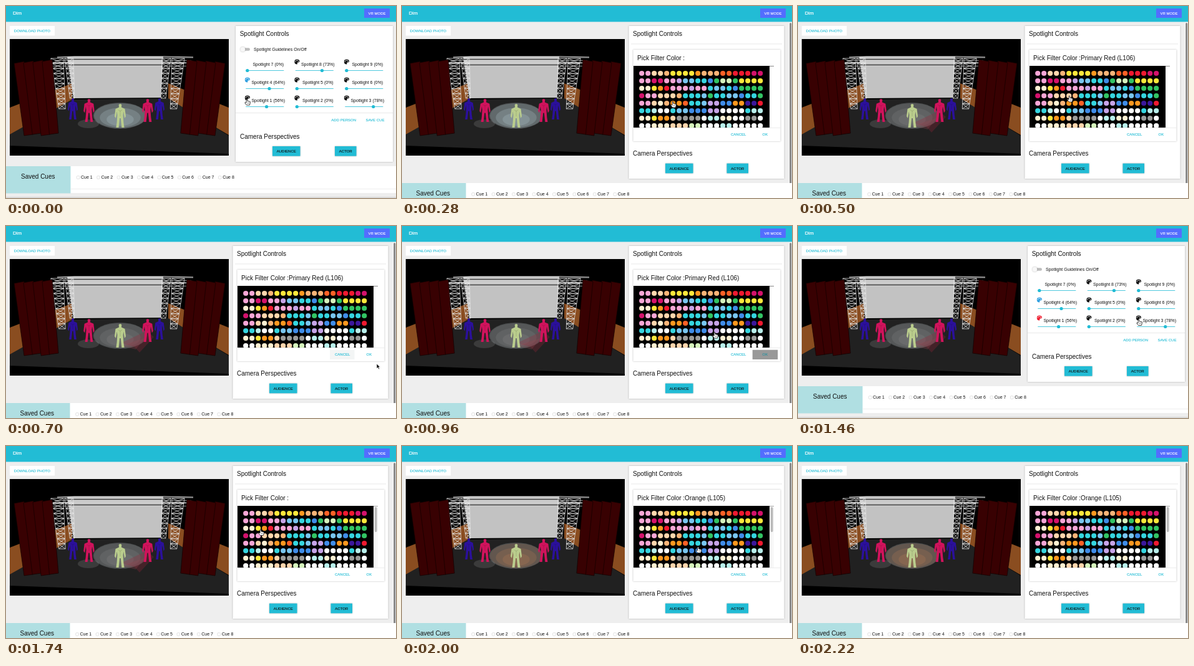
Write an HTML page that moves like this. It is 625 by 308 pixels and loops after 2.24 s.

```html
<!DOCTYPE html>
<html lang="en">
<head>
<meta charset="utf-8">
<title>Stage lighting</title>
<style>
html, body { margin: 0; width: 100%; height: 100%; overflow: hidden; background: #eee; }
svg { display: block; width: 625px; height: 308px; font-family: "Liberation Sans", Arial, sans-serif; }
.paper { filter: drop-shadow(0 .7px .9px rgba(0,0,0,.3)); }
</style>
</head>
<body>
<svg id="app" viewBox="0 0 625 308" xmlns="http://www.w3.org/2000/svg"></svg>
<script>
const LOOP = 2240;
const CYAN = '#22bcd5', INK = '#111';

const rect = (x, y, w, h, fill, more = '') =>
  `<rect x="${x}" y="${y}" width="${w}" height="${h}" fill="${fill}" ${more}/>`;
const text = (x, y, size, s, fill = INK, more = '') =>
  `<text x="${x}" y="${y}" font-size="${size}" fill="${fill}" ${more}>${s}</text>`;
const label = (x, y, s, fill = CYAN, more = '') =>
  text(x, y, 6, s, fill, `stroke="${fill}" stroke-width=".12" ${more}`);
const poly = (points, fill, more = '') => `<polygon points="${points.join(' ')}" fill="${fill}" ${more}/>`;
const line = (d, color, w = .8) => `<path d="${d}" fill="none" stroke="${color}" stroke-width="${w}"/>`;
const dot = (x, y, r, fill, more = '') => `<circle cx="${x}" cy="${y}" r="${r}" fill="${fill}" ${more}/>`;
const oval = (x, y, rx, ry, fill, o) =>
  `<ellipse cx="${x}" cy="${y}" rx="${rx}" ry="${ry}" fill="${fill}" opacity="${o}"/>`;
const group = (id, body) => `<g id="${id}">${body}</g>`;
const paper = (x, y, w, h, fill = '#fff') => rect(x, y, w, h, fill, 'class="paper"');
const mix = (a, b, k) => a + (b - a) * k;

function seeded(seed) {
  return () => (seed = (seed * 16807) % 2147483647) / 2147483647;
}

// The camera looks down, so verticals lean towards the middle of the stage
const MID = 182;
const lean = (x, y, rate = .00077) => mix(x, MID, (y - 85) * rate);

function truss(left, right, bottom) {
  const n = Math.round((bottom - 84) / 8);
  const taper = k => (right - left) * .2 * k;
  const at = (x, k, side) => {
    const y = mix(84, bottom, k);
    return `${(lean(x, y, .001) + side * taper(k)).toFixed(1)} ${y.toFixed(1)}`;
  };
  let d = `M${at(left, 0, 1)}L${at(left, 1, 1)}M${at(right, 0, -1)}L${at(right, 1, -1)}`;
  for (let i = 0; i < n; i++) {
    const a = i / n, b = (i + 1) / n;
    d += `M${at(left, a, 1)}L${at(right, a, -1)}L${at(left, b, 1)}L${at(right, b, -1)}`;
    d += `M${at(left, a, 1)}L${at(right, b, -1)}`;
  }
  return line(d, '#e6e6e6', .75);
}

function curtains(flip) {
  let s = '';
  for (let i = 0; i < 4; i++) {
    const x = 13 + i * 15, top = 92 - i, foot = 208 - i % 2 * 2;
    const side = v => (flip ? 2 * MID - v : v).toFixed(1);
    const l = lean(x, foot), r = lean(x + 16, foot);
    s += poly([side(x), top, side(x + 16), top - 3, side(r), foot - 2, side(l), foot], '#380102',
      'stroke="#120000" stroke-width=".7"');
  }
  return s;
}

function figure(x, y, h, fill) {
  const half = [[0, 0], [2.3, 1], [2, 5.6], [7.5, 8], [9, 20], [7, 23], [5.2, 12.5], [4.6, 18], [5.4, 30], [6.6, 38], [2.4, 38], [.8, 23]];
  const all = half.concat(half.slice(1).reverse().map(([a, b]) => [-a, b]));
  return `<g transform="translate(${x} ${y}) scale(${h / 38})">${poly(all, fill)}` +
    line('M-3 10Q0 13 3 10M0 11V20', 'rgba(0,0,0,.18)', .7) + '</g>';
}

function stage() {
  const frame = 'x="6" y="53" width="351" height="187"';
  let s = `<clipPath id="view"><rect ${frame}/></clipPath><g clip-path="url(#view)"><rect ${frame} fill="#000"/>`;
  for (const edge of [6, 357]) {
    const back = edge < MID ? 106 : 260;
    s += poly([back, 124, edge, 163, edge, 207, back, 150], '#8a4d20');
  }
  s += poly([6, 206, 106, 150, 260, 148, 357, 208, 357, 237, 6, 224], '#212121');
  s += poly([98, 81, 252, 81, 248, 147, 108, 148], '#c2c2c2');
  for (let i = 0; i < 4; i++) {
    const y = 81 + i * 4.5;
    s += line(`M${82 - i * 4} ${y + 1}L110 ${y}H254L${300 - i * 3} ${y + 1}`, i % 2 ? '#1b1b1b' : '#e4e4e4', 1);
    s += line(`M${82 - i * 4} ${y + 2}H104M252 ${y + 2}H${300 - i * 3}`, '#ddd', .6);
  }
  for (const [a, b, foot] of [[72, 92, 165], [94, 108, 148]]) {
    s += truss(a, b, foot) + truss(2 * MID - b - 6, 2 * MID - a - 6, foot);
  }
  s += curtains(false) + curtains(true);
  s += oval(132, 189, 17, 7, '#777', .3) + oval(182.5, 176, 43, 21, '#8d979a', .36);
  const rings = (id, color, o) => group(id, [1, .78, .52].map((k, i) =>
    oval(183, 176 + i * 3, 42 * k, 20 * k, color, o)).join(''));
  s += rings('white', '#b4cbd2', .23) + rings('dim', '#a0a0a0', .14) + rings('orange', '#c98058', .2);
  s += group('red', poly([184, 188, 226, 168, 237, 178, 214, 203, 206, 194], 'rgba(150,38,58,.3)') +
    poly([183, 192, 222, 180, 208, 198], 'rgba(150,70,80,.28)'));
  for (const side of [-1, 1]) {
    s += figure(176.5 + side * 69.5, 148, 34, '#2b109b') + figure(180 + side * 47, 149, 37, '#d0135c');
  }
  return s + figure(183, 157, 38, '#bacd8d') + '</g>';
}

function cues(dx, y, left) {
  let s = rect(0, y, 625, 43, '#fff') + rect(0, y, left, 43.5, '#b0dfe2');
  s += text(24 + dx, y + 20.2, 10, 'Saved Cues');
  for (let i = 0; i < 8; i++) {
    const x = 120 + dx + i * 32.45;
    s += rect(x - 6.7, y + 15.7, 4.6, 4.6, '#fff', 'rx="1" stroke="#c4c4c4" stroke-width=".5"');
    s += text(x, y + 20.2, 7, 'Cue ' + (i + 1));
  }
  return s;
}

function cameras(x, y, gap) {
  const button = (bx, w, name) => paper(bx, y + 12.3, w, 15.7, CYAN) +
    label(bx + w / 2, y + 22.4, name, INK, 'text-anchor="middle"');
  return text(x, y, 10, 'Camera Perspectives') + button(x + 52, 44.5, 'AUDIENCE') + button(x + gap, 34.5, 'ACTOR');
}

// Artist's palette with four paint wells
function icon(x, y, fill, id) {
  const wells = [0, 1, 2, 3].map(i => {
    const a = Math.PI * (1.08 + i * .28);
    return dot((x + 2.5 * Math.cos(a)).toFixed(2), (y + 2.5 * Math.sin(a)).toFixed(2), .7, '#fff');
  }).join('');
  return `<path id="${id}" fill="${fill}" d="M${x} ${y - 4}a4 4 0 1 0 0 8q1.2-.4.5-1.8q-.2-1 .7-1.2h1.2q1.8-.2 1.8-2q-.4-3-4.2-3z"/>` + wells;
}

function mainPage() {
  const levels = [0, 73, 0, 64, 0, 0, 56, 0, 78];
  let s = paper(368, 32, 252, 218) + text(374.7, 48, 10, 'Spotlight Controls');
  s += rect(378, 67.2, 13, 4.6, '#bdbdbd', 'rx="2.3"') + dot(379.5, 69.5, 3.8, '#f7f7f7', 'class="paper"');
  s += text(397, 72, 7, 'Spotlight Guidelines On/Off');
  levels.forEach((level, i) => {
    const col = i % 3, row = (i - col) / 3, n = 7 - 3 * row + col;
    const x = 384.3 + col * 79.5, y = 103.5 + row * 29;
    s += line(`M${x} ${y}h61`, CYAN, .8) + dot(x + 2.5 + level * .55, y, 2.6, CYAN);
    s += text(x + 36, y - 8, 7, `Spotlight ${n} (${level}%)`, INK, 'text-anchor="middle"');
    if (i) s += icon(x + 2.5, y - 14, n === 4 ? '#2f9fe0' : INK, 'icon' + n);
  });
  s += rect(368, 171, 252, .8, '#e4e4e4') + label(521.3, 184.7, 'ADD PERSON') + label(576.5, 184.7, 'SAVE CUE');
  return s + cameras(375, 212.7, 152) + cues(0, 257, 103.5) +
    rect(103.5, 293, 522, .7, '#e8e8e8') + rect(0, 306.6, 625, .8, '#bbb');
}

// Each row runs through its own colour ramp with a little shuffling
function swatches() {
  const hue = {
    p: '#f8a6d6', c: '#fff0d2', a: '#ffd6ad', t: '#f9b477', o: '#ff981f', y: '#ffe83b', r: '#f01930',
    d: '#ff6126', m: '#d4116c', l: '#c7a4e8', s: '#78c6f1', b: '#3f8ce8', q: '#35d5df',
    g: '#32c463', i: '#3b179c', w: '#ffffff', e: '#9b9b99', u: '#b9f0ec', v: '#d6f4bd'
  };
  const ramps = ['pcatyyotddrrm', 'pmmplsqbgvgyy', 'cyorplpqsqbgg', 'mpaatqsgqsbqg', 'pactodqslbyoir', 'quwqsbblwwqu', 'cyoaeewuvcwew', 'wcavwuww'];
  const rnd = seeded(41);
  let s = '';
  ramps.forEach((ramp, row) => {
    for (let i = 0; i < 20; i++) {
      const k = Math.floor((i + rnd() * 1.2) * ramp.length / 20);
      s += dot(384.2 + i * 10, 108 + row * 12, 4.1, hue[ramp[Math.min(k, ramp.length - 1)]]);
    }
  });
  return s;
}

function pickerPage() {
  let s = rect(619.5, 25, 5.5, 283, '#f3f3f3') + rect(621.2, 27, 3, 263, '#858585', 'rx="1.5"');
  s += paper(363.5, 32, 249, 245) + text(370, 48, 10, 'Spotlight Controls');
  s += rect(367, 60.5, 242, .8, '#e4e4e4') + paper(370.5, 70, 236, 147);
  s += text(377, 87.3, 10, '', INK, 'id="title"');
  s += rect(371, 96, 225, .7, '#555') + rect(371, 96, 218, 99, '#000');
  s += `<clipPath id="well"><rect x="371" y="96" width="218" height="99"/></clipPath><g clip-path="url(#well)">${swatches()}</g>`;
  s += group('bar', rect(589, 96.7, 7, 98.3, '#f8f8f8') + rect(590.6, 98, 4, 40, '#bcbcbc', 'rx="2"'));
  s += rect(371, 195, 235.5, .7, '#e4e4e4');
  s += rect(519, 198.5, 39.5, 15.5, '#f3f5f5', 'id="cancelBg"') + rect(561.7, 198.7, 40.5, 15.3, '#999', 'id="okBg"');
  s += label(527, 208.4, 'CANCEL') + label(577.5, 208.4, 'OK', CYAN, 'id="ok"');
  return s + cameras(370, 240.3, 150.5) + cues(-1.5, 284, 102.5);
}

const hand = '<path d="M-.9 .8Q0-.5 .9 .8V3.4L5.3 4.4V7.1L4.3 10H-.4L-3.2 6.5Q-3 5-1.9 5.7L-.9 6.3Z" fill="#fff" stroke="#111" stroke-width=".8"/>' +
  line('M1.5 5.5V8M3.2 5.5V8', '#333', .5);
const arrow = '<path d="M0 0V7.6L1.8 6 3.1 8.8 4.5 8.2 3.2 5.4H5.6Z" fill="#111" stroke="#fff" stroke-width=".6"/>';

document.getElementById('app').innerHTML =
  rect(0, 0, 625, 308, '#eee') + group('main', mainPage()) + group('picker', pickerPage()) +
  rect(0, 0, 625, 25.4, CYAN) + text(11, 14.3, 8, 'Dim', '#fff', 'stroke="#fff" stroke-width=".2"') +
  rect(574, 4, 41, 15, '#536dfe') + label(580.5, 13.8, 'VR MODE', '#fff') +
  rect(6, 32, 72, 15.5, '#fff') + label(12.8, 41.9, 'DOWNLOAD PHOTO') + stage() +
  group('cursor', group('hand', hand) + group('arrow', arrow));

const $ = id => document.getElementById(id);
const show = (id, on) => { $(id).style.display = on ? '' : 'none'; };

// Events of the loop, in ms
const OPEN = 80, PICK = 440, PRESS = 850, CLOSE = 1020, REOPEN = 1540, REPICK = 1860;

// Pointer stops: arrival, departure, x, y
const stops = [
  [0, OPEN, 386, 149], [280, 290, 434, 153], [390, 470, 414, 132], [590, 600, 540, 204], [700, 710, 594, 221],
  [790, 870, 582, 205], [960, 1020, 501, 170], [1400, 1560, 546, 149.5], [1740, 1900, 408, 133.5], [2180, LOOP, 632, 228]
];

function pointer(t) {
  const i = stops.findIndex(s => t <= s[1]);
  const b = stops[i], a = stops[i - 1] || b;
  const k = t >= b[0] ? 1 : (t - a[1]) / (b[0] - a[1]);
  const e = k * k * (3 - 2 * k);
  return [mix(a[2], b[2], e), mix(a[3], b[3], e)];
}

function draw(t) {
  const second = t >= REOPEN;
  const open = second || (t >= OPEN && t < CLOSE);
  const red = t >= PICK, orange = t >= REPICK, pressed = t >= PRESS && t < CLOSE;
  const [x, y] = pointer(t);
  const below = open && y > 214;

  show('main', !open);
  show('picker', open);
  show('bar', second);
  show('cancelBg', t >= 560 && t < 760);
  show('okBg', pressed);
  $('ok').setAttribute('fill', pressed ? '#267e89' : CYAN);
  $('title').textContent = 'Pick Filter Color :' +
    (second ? (orange ? 'Orange (L105)' : '') : (red ? 'Primary Red (L106)' : ''));
  $('icon1').setAttribute('fill', red ? '#ef1c2f' : INK);

  show('white', !red);
  show('dim', red && !orange);
  show('red', red && !orange);
  show('orange', orange);

  show('hand', !below);
  show('arrow', below);
  show('cursor', x < 625);
  $('cursor').setAttribute('transform', `translate(${x.toFixed(2)} ${y.toFixed(2)})`);
}

const start = performance.now();
function tick() {
  draw((performance.now() - start) % LOOP);
  requestAnimationFrame(tick);
}
draw(0);
requestAnimationFrame(tick);
</script>
</body>
</html>
```
